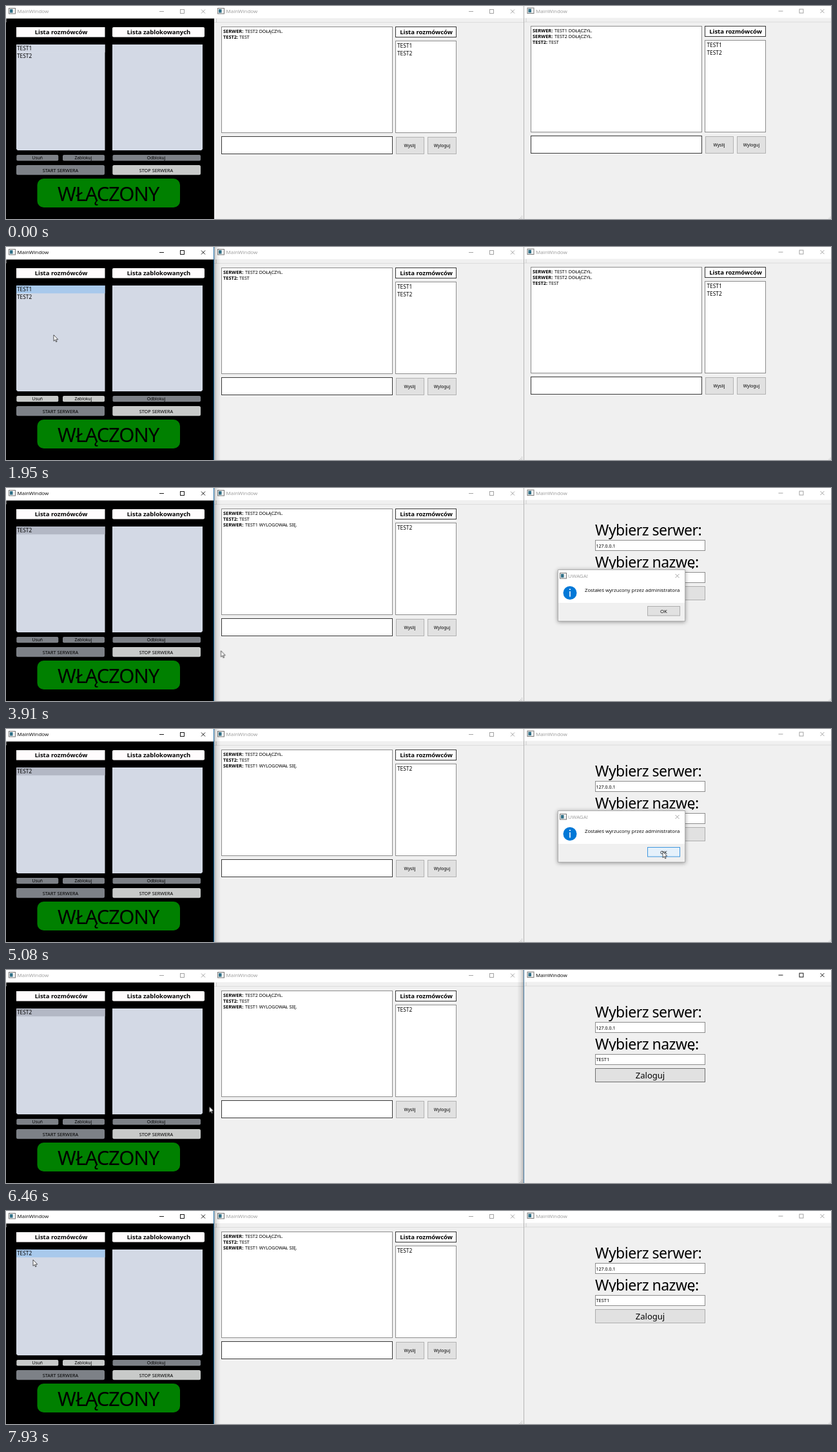
Recreate the animation shown at these times as an HTML page. Size 1280 by 332 pixels, loop 8000 ms.

```html
<!DOCTYPE html>
<html lang="pl">
<head>
<meta charset="utf-8">
<title>MainWindow</title>
<style>
html, body { margin: 0; width: 100%; height: 100%; overflow: hidden; background: #f0f0f0; }
svg { display: block; width: 100%; height: 100%; font-family: "Noto Sans", "Open Sans", sans-serif; }
text { fill: #000; white-space: pre; }
.name { font: 8px "Open Sans", sans-serif; fill: currentColor; }
.head { font-size: 9.5px; font-weight: bold; text-anchor: middle; }
.item { font-size: 8.3px; }
.chat { font-size: 7.1px; }
.chat .b { font-size: 7.4px; font-weight: bold; }
.small { font-size: 6.7px; text-anchor: middle; }
.wide { font-size: 7.3px; text-anchor: middle; }
.big { font-size: 23px; letter-spacing: -.5px; }
.notice { font: 7.75px "Open Sans", sans-serif; }
.field { fill: #fff; stroke: #8c8c8c; }
.dark { stroke: #383838; }
.btn { fill: #e1e1e1; stroke: #b2b2b2; }
.off { fill: #7d8187; }
.on { fill: #c8cac9; }
.list { fill: #d3d9e5; }
.edge { stroke: var(--edge); }
.shade { opacity: var(--shade); }

/* 1% of the loop is 80 ms */
.t { animation: 8s step-end infinite; }
.front1 { animation-name: front1; }
.front3 { animation-name: front3; }
.row { animation-name: row; }
.out { animation-name: out; }
.up { animation-name: up; }
.left { animation-name: in; }
.members { animation-name: members; }
.login { animation-name: login; }
.tool { animation-name: tool; }
.enter { animation-name: enter; }
.ok { animation-name: ok; }
.dialog { animation-name: dialog; transform-box: fill-box; transform-origin: center; }
.mouse { animation: shown 8s step-end infinite, path 8s linear infinite; }

@keyframes front1 {
  0%, 71.4%, 100% { color: #999; --edge: transparent; --shade: 0; }
  15.125%, 92.25% { color: #000; --edge: #1c6ea8; --shade: 1; }
}
@keyframes front3 {
  0%, 92.25%, 100% { color: #999; --edge: #b4b4b4; --shade: 0; }
  71.4% { color: #000; --edge: #4a7ea6; --shade: 1; }
}
@keyframes row {
  0% { fill: #d3d9e5; }
  13% { fill: #b9d0ec; }
  15.125%, 92.25% { fill: #a0c4ea; }
  24.375%, 87.5%, 97.25%, 100% { fill: #a8c9ec; }
  35.25% { fill: #b3b8c5; }
}
@keyframes out { 0% { visibility: visible; } 35.25%, 100% { visibility: hidden; } }
@keyframes in { 0% { visibility: hidden; } 35.25%, 100% { visibility: visible; } }
@keyframes up { 0% { transform: none; } 35.25%, 100% { transform: translateY(-12px); } }
@keyframes members { 0% { visibility: visible; } 39.25%, 100% { visibility: hidden; } }
@keyframes login { 0% { visibility: hidden; } 39.25%, 100% { visibility: visible; } }
@keyframes tool {
  0%, 35.25% { fill: #7d8187; }
  15.125%, 92.25%, 100% { fill: #c8cac9; }
}
@keyframes enter {
  0% { fill: #e5f1fb; stroke: #0078d7; }
  40% { fill: #e5f1fb; stroke: #0078d7; animation-timing-function: linear; }
  43%, 92.25%, 100% { fill: #e1e1e1; stroke: #adadad; }
  71.4% { fill: #e1e1e1; stroke: #707070; }
}
@keyframes ok {
  0% { fill: #e1e1e1; stroke: #adadad; }
  61%, 100% { fill: #e5f1fb; stroke: #3f97df; }
}
@keyframes dialog {
  0% { opacity: 0; transform: scale(.92); }
  40% { opacity: 0; transform: scale(.92); animation-timing-function: ease-out; }
  43% { opacity: 1; transform: none; }
  72.375% { opacity: 1; transform: none; animation-timing-function: linear; }
  73.25% { opacity: .3; transform: scale(.967); }
  74.125%, 100% { opacity: 0; transform: scale(.95); }
}
@keyframes shown { 0% { visibility: hidden; } .875%, 100% { visibility: visible; } }
@keyframes path {
  0%, .875% { transform: translate(310px, 311px); }
  10.75%, 11.625% { transform: translate(36px, 111px); }
  13.75% { transform: translate(45px, 64px); }
  20.6%, 23.5% { transform: translate(60px, 65px); }
  24.375%, 25.3% { transform: translate(74px, 137px); }
  31.25%, 44.4% { transform: translate(65px, 236px); }
  50% { transform: translate(400px, 258px); }
  54.75% { transform: translate(793px, 232px); }
  60% { transform: translate(1034px, 203px); }
  63.5%, 71.4% { transform: translate(1019px, 191px); }
  73.25%, 73.8% { transform: translate(1010px, 191px); }
  80.75% { transform: translate(316px, 213px); }
  87.6%, 89.1% { transform: translate(27px, 60px); }
  91.5%, 96.5% { transform: translate(42px, 64px); }
  99.1%, 100% { transform: translate(42px, 76px); }
}
</style>
</head>
<body>
<svg viewBox="0 0 1280 332">
  <defs>
    <linearGradient id="fade">
      <stop stop-opacity=".26"/>
      <stop offset=".4" stop-opacity=".09"/>
      <stop offset="1" stop-opacity="0"/>
    </linearGradient>
    <rect id="shadow" width="10" height="332" fill="url(#fade)"/>
    <g id="icon">
      <rect x=".5" y=".5" width="10" height="8.5" fill="#f4f4f4" stroke="#777"/>
      <rect x="2" y="2" width="4.5" height="5.5" fill="#2f6f86"/>
    </g>
    <g id="title">
      <use href="#icon" x="4" y="3"/>
      <text class="name" x="17.5" y="11">MainWindow</text>
    </g>
    <path id="close" d="M0 0L6 6M6 0L0 6" fill="none" stroke="currentColor" stroke-width=".9"/>
    <g id="controls" fill="none" stroke="currentColor" stroke-width=".9">
      <path d="M0 3.5H7"/>
      <rect x="32.5" y=".5" width="6" height="6"/>
      <use href="#close" x="65" y=".5"/>
    </g>
    <g id="frame">
      <rect x="323" width="480" height="19" fill="#fff"/>
      <path d="M323 25.5H803" stroke="#dcdcdc"/>
      <path d="M326.5 20V25" stroke="#b0b0b0" stroke-dasharray="1"/>
      <path d="M796 331.5H802M798 329.5H802M800 327.5H802" stroke="#b4b4b4" stroke-dasharray="1"/>
      <use href="#title" x="324"/>
      <use href="#controls" x="718" y="5"/>
    </g>
    <g id="room">
      <rect class="field" x="334.5" y="32.5" width="265" height="165"/>
      <rect class="field dark" x="604.5" y="32.5" width="94" height="16"/>
      <text class="head" x="652" y="44">Lista rozmówców</text>
      <rect class="field" x="604.5" y="54.5" width="94" height="143"/>
      <rect class="field dark" x="334.5" y="203.5" width="265" height="27"/>
      <rect class="btn" x="605.5" y="204.5" width="43" height="26"/>
      <rect class="btn" x="654.5" y="204.5" width="44" height="26"/>
      <text class="small" x="626.5" y="220">Wyslij</text>
      <text class="small" x="676.5" y="220">Wyloguj</text>
    </g>
    <clipPath id="cut"><rect x="910" y="100" width="180" height="26"/></clipPath>
  </defs>

  <rect width="1280" height="332" fill="#f0f0f0"/>

  <!-- second member -->
  <use href="#frame" color="#999"/>
  <use href="#room"/>
  <g class="chat">
    <text class="b" x="337" y="42">SERWER:</text><text x="371" y="42">TEST2 DOŁĄCZYŁ.</text>
    <text class="b" x="337" y="50.7">TEST2:</text><text x="362" y="50.7">TEST</text>
    <g class="t left">
      <text class="b" x="337" y="59.5">SERWER:</text><text x="371" y="59.5">TEST1 WYLOGOWAŁ SIĘ.</text>
    </g>
  </g>
  <text class="item t out" x="607" y="64.6">TEST1</text>
  <text class="item t up" x="607" y="76.6">TEST2</text>

  <!-- server panel -->
  <g class="t front1">
    <use class="shade" href="#shadow" x="323"/>
    <rect width="323" height="332"/>
    <rect width="323" height="19.5" fill="#fff"/>
    <path class="edge" d="M322.5 0V332"/>
    <use href="#title"/>
    <use href="#controls" x="238" y="5"/>
  </g>
  <path d="M.5 20V25" stroke="#ccc" stroke-dasharray="1"/>
  <rect x="16" y="33" width="137.5" height="15.5" fill="#fffcfd"/>
  <rect x="165" y="33" width="143" height="15.5" rx="2" fill="#fffcfd"/>
  <text class="head" x="85.5" y="44">Lista rozmówców</text>
  <text class="head" x="237" y="44">Lista zablokowanych</text>
  <path class="list" d="M16 60H153.5V225H18L16 223Z"/>
  <path class="list" d="M165 60H305V223L303 225H165Z"/>
  <rect class="t row" x="16" y="60" width="137.5" height="12.3"/>
  <text class="item t out" x="17" y="69.3">TEST1</text>
  <text class="item t up" x="17" y="81.3">TEST2</text>
  <rect class="t tool" x="16.3" y="232" width="65" height="9.3" rx="2"/>
  <rect class="t tool" x="88" y="232" width="65" height="9.3" rx="2"/>
  <rect class="off" x="165.5" y="232" width="136.5" height="9.3" rx="2"/>
  <rect class="off" x="16" y="248" width="137" height="15.3" rx="2.5"/>
  <rect class="on" x="165.3" y="248" width="136.7" height="15.3" rx="2.5"/>
  <text class="small" x="48.8" y="239">Usuń</text>
  <text class="small" x="120" y="239">Zablokuj</text>
  <text class="small" x="233" y="239">Odblokuj</text>
  <text class="wide" x="84.5" y="258.6">START SERWERA</text>
  <text class="wide" x="233" y="258.6">STOP SERWERA</text>
  <rect x="48.5" y="269" width="221.5" height="45" rx="10" fill="#008000"/>
  <text x="80" y="304" font-size="31" letter-spacing="-1.2">WŁĄCZONY</text>

  <!-- first member -->
  <g class="t front3">
    <use class="shade" href="#shadow" transform="translate(803) scale(-1 1)"/>
    <use href="#frame" x="480.5" y="-.5"/>
    <path class="edge" d="M803.5 0V332"/>
  </g>
  <g class="t members">
    <use href="#room" x="480" y="-1"/>
    <g class="chat">
      <text class="b" x="817" y="41.2">SERWER:</text><text x="851" y="41.2">TEST1 DOŁĄCZYŁ.</text>
      <text class="b" x="817" y="50">SERWER:</text><text x="851" y="50">TEST2 DOŁĄCZYŁ.</text>
      <text class="b" x="817" y="58.8">TEST2:</text><text x="842" y="58.8">TEST</text>
    </g>
    <text class="item" x="1087.5" y="64">TEST1</text>
    <text class="item" x="1087.5" y="76">TEST2</text>
  </g>
  <g class="t login">
    <text class="big" x="914" y="74">Wybierz serwer:</text>
    <rect class="field" x="914.5" y="81.5" width="170" height="16"/>
    <text x="915.5" y="92.6" font-size="7.1">127.0.0.1</text>
    <text class="big" x="914" y="123.5" clip-path="url(#cut)">Wybierz nazwę:</text>
    <rect class="field" x="914.5" y="131.5" width="170" height="16"/>
    <text x="915.5" y="142.2" font-size="7.4">TEST1</text>
    <rect class="t enter" x="914.5" y="153.5" width="170" height="21"/>
    <text x="999.5" y="169.3" font-size="13" text-anchor="middle">Zaloguj</text>
  </g>

  <!-- notice -->
  <g class="t dialog" color="#999">
    <g style="filter: drop-shadow(0 1px 3px #0006)">
      <rect x="856.5" y="127.5" width="197" height="80" fill="#fff" stroke="#b0b0b0"/>
    </g>
    <rect x="857" y="179" width="196" height="28" fill="#f0f0f0"/>
    <use href="#icon" x="859" y="132"/>
    <text class="name" x="872" y="140">UWAGA!</text>
    <use href="#close" x="1038.5" y="134"/>
    <circle cx="875" cy="163.5" r="10.5" fill="#0078d7"/>
    <path d="M875 161V169.5" stroke="#fff" stroke-width="1.6"/>
    <circle cx="875" cy="158" r="1.1" fill="#fff"/>
    <text class="notice" x="898" y="161.6">Zostałeś wyrzucony przez administratora</text>
    <rect class="t ok" x="995.5" y="184.5" width="50" height="14.5"/>
    <text class="notice" x="1020.3" y="194.7" text-anchor="middle">OK</text>
  </g>

  <path class="mouse" d="M0 0V9.6L2.2 7.6L3.7 11L5.1 10.4L3.7 7.1H6.7Z" fill="#fff" stroke="#111" stroke-width=".7"/>
</svg>
</body>
</html>
```
